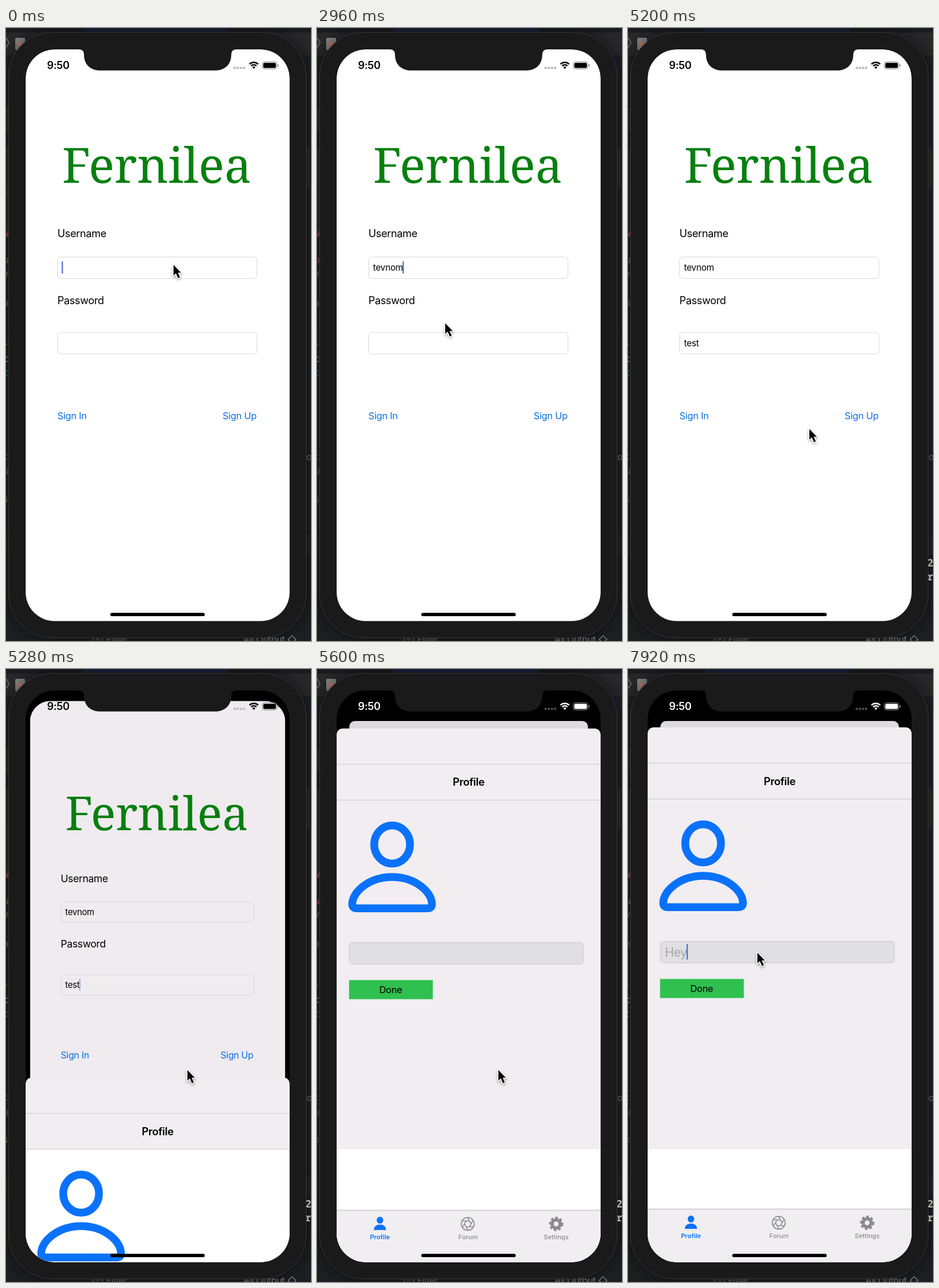
An HTML page with a canvas that plays this animation: 528 px wide and 1061 px high, repeating every 8 s.

```html
<!DOCTYPE html>
<html lang="en">
<head>
<meta charset="utf-8">
<title>Sign in</title>
<style>
  html, body { margin: 0; width: 100%; height: 100%; overflow: hidden; background: #202126; }
  canvas { display: block; }
</style>
</head>
<body>
<canvas id="stage" width="528" height="1061"></canvas>
<script>
const c = document.getElementById('stage').getContext('2d');
const LOOP = 8000, STEP = 80;
const BLUE = '#0a72fa', LINK = '#0b6fe6', CARET = '#3b62cc', GREY = '#8b8a8f', PAPER = '#f1edf1';
const USER = 'tevnom', PASS = 'test', NOTE = 'Hey';
const SHEET_TOP = 101, SCREEN = { x: 34, y: 37, w: 457, h: 989.5, r: 50 };

// Pointer tip: [time, x, y]
const POINTER = [
  [0, 290, 410], [2720, 290, 410], [2800, 266, 438], [2880, 236, 476], [2960, 222, 511],
  [3040, 204, 532], [3120, 199, 538], [4080, 199, 538], [4160, 195, 554], [4240, 155, 682],
  [4320, 140, 701], [4400, 126, 705], [4480, 104, 671], [4800, 104, 671], [4880, 246, 682],
  [4960, 314, 694], [5840, 314, 694], [6480, 394, 925], [6560, 394, 925], [6720, 385, 860],
  [7200, 224, 491]
];
// Caret opacity: [time, alpha], held until the next entry
const USER_CARET = [[0, 1], [160, .5], [240, 0], [480, 1], [720, .5], [800, 0], [1040, .4], [1120, .8],
  [1200, 1], [2560, .5], [2640, 0], [2880, 1], [3120, 0]];
const PASS_CARET = [[0, 0], [3280, 1], [4320, .5], [4400, 0], [4640, 1], [5040, .5], [5120, 0], [5280, .5], [5360, 0]];
const NOTE_CARET = [[0, 0], [7360, 1]];

const held = (keys, t) => keys.filter(k => k[0] <= t).pop()[1];
const typed = (text, t, start, gap) => text.slice(0, Math.max(0, Math.floor((t - start) / gap) + 1));

function pointerAt(t) {
  const i = POINTER.findIndex(k => k[0] > t);
  if (i < 0) return POINTER[POINTER.length - 1].slice(1);
  const [a, b] = [POINTER[i - 1], POINTER[i]], f = (t - a[0]) / (b[0] - a[0]);
  return [a[1] + (b[1] - a[1]) * f, a[2] + (b[2] - a[2]) * f];
}

// Critically damped spring
function sheetProgress(t) {
  const x = Math.max(0, t - 5225.4) * .02238;
  return 1 - (1 + x) * Math.exp(-x);
}

function rect(x, y, w, h, fill) {
  c.fillStyle = fill;
  c.fillRect(x, y, w, h);
}

function round(x, y, w, h, r, fill, stroke, width = 1) {
  c.beginPath();
  c.roundRect(x, y, w, h, r);
  if (fill) { c.fillStyle = fill; c.fill(); }
  if (stroke) { c.strokeStyle = stroke; c.lineWidth = width; c.stroke(); }
}

function text(s, x, y, size, fill = '#000', { weight = 400, align = 'left', family = 'Inter, sans-serif', spacing = -.02 } = {}) {
  c.font = `${weight} ${size}px ${family}`;
  c.letterSpacing = spacing * size + 'px';
  c.textAlign = align;
  c.fillStyle = fill;
  c.fillText(s, x, y);
  return c.measureText(s).width;
}

function ellipse(x, y, rx, ry, fill, stroke, width) {
  c.beginPath();
  c.ellipse(x, y, rx, ry, 0, 0, 7);
  if (fill) { c.fillStyle = fill; c.fill(); }
  if (stroke) { c.strokeStyle = stroke; c.lineWidth = width; c.stroke(); }
}

function caret(x, y, h, alpha) {
  c.save();
  c.globalAlpha *= alpha;
  rect(x, y, 2, h, CARET);
  c.restore();
}

function desktop(t) {
  rect(0, 0, 528, 1061, '#202126');
  rect(0, 0, 528, 8, '#1c1d20');
  rect(133, 0, 251, 6, '#1b2540');
  rect(0, 8, 528, 40, '#29292c');
  rect(0, 48, 528, 1, '#151517');
  text('〉', -2, 33, 20, '#777', { family: 'Noto Sans CJK SC, sans-serif' });
  round(16, 17, 17, 21, 2, '#8b8887');
  ellipse(24, 28, 4, 4, '#c47b68');
  [[140, 38], [209, 73], [285, 67]].forEach(([y, h]) => round(-5, y, 11, h, 1, '#2b2b2d', '#444'));
  round(515, 209, 9, 66, 1, '#29292b', '#48484a');
  rect(0, 873, 528, 42, '#252529');
  rect(0, 873, 528, 1, '#0c0c0d');
  rect(0, 914, 528, 1, '#0c0c0d');
  rect(0, 915, 528, 146, '#1e1f22');
  const code = { family: 'Noto Sans Mono, monospace', spacing: 0 };
  [['w', 361, '#b84f68'], ['u', 407, '#b84f68'], ['v', 430, '#777'], ['a', 481, '#666'], ['-', 552, '#d45a50'],
   ['c', 578, '#bbb'], ['c', 602, '#4b788c'], ['c', 747, '#666'], ['u', 772, '#666'], ['s', 820, '#666']]
    .forEach(([s, y, fill]) => text(s, -5, y, 16, fill, code));
  text('o', 520, 748, 16, '#777', code);
  text('(=) Filter', 148, 1064, 16, '#707073');
  text('All Output ◇', 411, 1064, 16, '#8a8a8d');
}

function consoleOutput() {
  const bold = { family: 'Noto Sans Mono, monospace', spacing: 0, weight: 700 };
  text('2', 518, 932, 17, '#eee', bold);
  text('r', 518, 956, 17, '#eee', bold);
}

function bezel() {
  c.save();
  c.shadowColor = 'rgba(0,0,0,.6)';
  c.shadowBlur = 30;
  round(4.5, 7.5, 515, 1048, 76, '#1a1a1a');
  c.restore();
  round(4.5, 7.5, 515, 1048, 76, null, '#39393b');
}

function loginField(y, value, caretAlpha, selected) {
  round(89.5, y + .5, 345, 37, 5, null, '#d9d8da');
  if (selected) rect(94, y + 8, 58, 22, '#c5d8eb');
  const w = text(value, 97, y + 24, 15.3);
  caret(96.5 + w, y + 8, 21, caretAlpha);
}

function login(t, p) {
  const scale = 1 - .0963 * p;
  c.save();
  c.translate(262.5, 37 + 53 * p);
  c.scale(scale, scale);
  c.translate(-262.5, -37);
  c.beginPath();
  c.roundRect(SCREEN.x, SCREEN.y, SCREEN.w, 1100, SCREEN.r + (11 - SCREEN.r) * p);
  c.clip();
  rect(34, 37, 457, 1100, p ? PAPER : '#fff');
  text('Fernilea', 261, 268, 83.5, '#06800f', { align: 'center', family: 'Noto Serif, serif', spacing: 0 });
  text('Username', 89, 362, 18);
  loginField(396, typed(USER, t, 1360, 80), held(USER_CARET, t), t >= 1360 && t < 2240);
  text('Password', 89, 478, 18);
  loginField(526.5, typed(PASS, t, 3600, 100), held(PASS_CARET, t), false);
  c.globalAlpha = t >= 4560 && t < 4720 ? .3 : 1;
  text('Sign In', 89, 677, 16.4, LINK);
  c.globalAlpha = 1;
  text('Sign Up', 375, 677, 16.4, LINK);
  rect(34, 37, 457, 1100, `rgba(0,0,0,${.08 * p * p})`);
  c.restore();
}

function person() {
  ellipse(130, 301.7, 31, 33, null, BLUE, 13.5);
  c.beginPath();
  c.moveTo(61, 405);
  c.bezierCurveTo(61, 384, 90, 358, 130, 358);
  c.bezierCurveTo(170, 358, 199, 384, 199, 405);
  c.quadraticCurveTo(199, 412.3, 191, 412.3);
  c.lineTo(69, 412.3);
  c.quadraticCurveTo(61, 412.3, 61, 405);
  c.closePath();
  c.lineWidth = 13.5;
  c.stroke();
}

function tabBar() {
  rect(34, 934, 457, 100, '#f0eef1');
  rect(34, 934, 457, 1.5, '#c9c7ca');
  const label = { weight: 500, align: 'center', spacing: 0 };
  ellipse(109, 952, 5.7, 6, BLUE);
  c.beginPath();
  c.moveTo(98.5, 969);
  c.bezierCurveTo(98, 956.5, 120, 956.5, 119.5, 969);
  c.fill();
  text('Profile', 109, 985, 11, BLUE, { ...label, weight: 600 });

  ellipse(261, 958.5, 11.2, 11.2, null, GREY, 1.6);
  c.beginPath();
  for (let i = 0; i < 6; i++) {
    const a = i * Math.PI / 3, cos = Math.cos(a), sin = Math.sin(a);
    const at = (x, y) => [261 + x * cos - y * sin, 958.5 + x * sin + y * cos];
    c.moveTo(...at(-3, 5));
    c.lineTo(...at(10, 5));
  }
  c.stroke();
  text('Forum', 261.5, 985, 11, GREY, label);

  ellipse(414, 958.5, 7, 7, null, GREY, 5.5);
  c.setLineDash([4.4, 4.4 * .785]);
  ellipse(414, 958.5, 10.4, 10.4, null, GREY, 4);
  c.setLineDash([]);
  text('Settings', 414, 985, 11, GREY, label);
}

function sheet(t, p) {
  const dy = (1027 - SHEET_TOP) * (1 - p), top = SHEET_TOP + dy;
  c.save();
  c.beginPath();
  c.roundRect(34, top, 457, 1000, 10);
  c.clip();
  rect(34, top, 457, 1000, PAPER);
  const white = Math.max(831, top + 124);
  rect(34, white, 457, 1061 - white, '#fff');
  c.translate(0, dy);
  rect(34, 162.5, 457, 1, '#cbc8cc');
  rect(34, 224.5, 457, 1, '#cbc8cc');
  text('Profile', 262.5, 200.5, 18.3, '#000', { weight: 600, align: 'center' });
  person();
  round(56, 471.5, 405, 37, 5, '#e0dfe3', '#c6c5c9');
  const w = text(typed(NOTE, t, 7600, 160), 64, 497.5, 21, '#a6a5aa');
  caret(63.5 + w, 476, 27, held(NOTE_CARET, t));
  rect(55.5, 536.5, 145, 33, '#2fc04f');
  text('Done', 127.5, 559, 16.4, '#000', { align: 'center' });
  tabBar();
  c.restore();
}

function statusBar(ink) {
  text('9:50', 71, 71, 18, ink, { weight: 600 });
  for (let i = 0; i < 4; i++) round(394 + i * 5.4, 67, 4, 4, 1.3, ink === '#fff' ? '#4a4a4a' : '#bdbdbf');
  c.strokeStyle = c.fillStyle = ink;
  c.lineWidth = 2.6;
  for (const r of [6.7, 11]) {
    c.beginPath();
    c.arc(429, 70.5, r, -2.33, -.81);
    c.stroke();
  }
  c.beginPath();
  c.moveTo(429, 71);
  c.arc(429, 70.5, 3.7, -2.33, -.81);
  c.fill();
  round(443.5, 58.5, 25.5, 12.5, 4, null, GREY);
  round(445.3, 60.2, 22, 9, 2.3, ink);
  round(470.3, 62.5, 1.5, 4.5, 1, GREY);
}

function notch() {
  c.beginPath();
  c.moveTo(126, 36);
  c.lineTo(126, 37);
  c.quadraticCurveTo(135, 37, 135, 46);
  c.bezierCurveTo(135, 63, 146, 73.5, 163, 73.5);
  c.lineTo(362, 73.5);
  c.bezierCurveTo(379, 73.5, 390, 63, 390, 46);
  c.quadraticCurveTo(390, 37, 399, 37);
  c.lineTo(399, 36);
  c.fillStyle = '#1a1a1a';
  c.fill();
}

function pointer([x, y]) {
  const arrow = new Path2D('M0 0V18.5L4.2 14.6L7.9 23L11.2 21.5L7.5 13.4H13Z');
  c.save();
  c.translate(x, y);
  c.lineJoin = 'round';
  c.lineWidth = 3;
  c.strokeStyle = '#fff';
  c.shadowColor = 'rgba(0,0,0,.35)';
  c.shadowBlur = 4;
  c.shadowOffsetY = 2;
  c.stroke(arrow);
  c.shadowColor = 'transparent';
  c.fillStyle = '#000';
  c.fill(arrow);
  c.restore();
}

function draw(now) {
  const t = Math.floor(now % LOOP / STEP) * STEP, p = sheetProgress(t);
  desktop();
  if (t >= 4640) consoleOutput();
  bezel();
  c.save();
  c.beginPath();
  c.roundRect(SCREEN.x, SCREEN.y, SCREEN.w, SCREEN.h, SCREEN.r);
  c.clip();
  rect(34, 37, 457, 990, '#000');
  login(t, p);
  if (p > 0) sheet(t, p);
  statusBar(p > .5 ? '#fff' : '#000');
  round(180.5, 1012.3, 163.5, 5.7, 2.8, '#000');
  c.restore();
  notch();
  pointer(pointerAt(t));
}

const start = performance.now();
(function frame() {
  draw(performance.now() - start);
  requestAnimationFrame(frame);
})();
</script>
</body>
</html>
```
